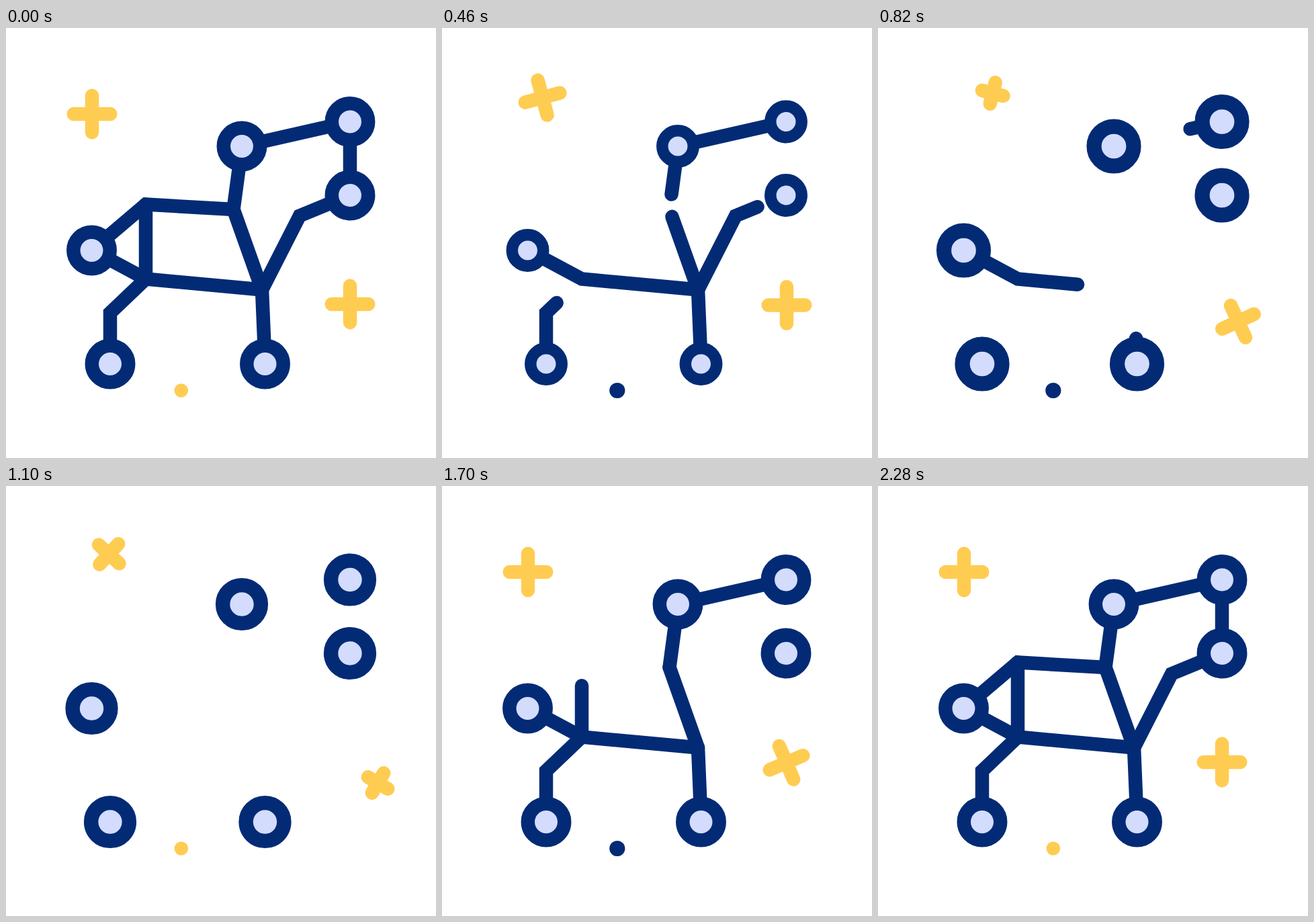
Animation, 640 px wide and 640 px high, one loop 2.8 s. Source, as an HTML page:

```html
<!DOCTYPE html>
<html lang="en">
<head>
<meta charset="utf-8">
<title>Constellation</title>
<style>
  html, body { margin: 0; width: 100%; height: 100%; overflow: hidden; background: #fff; }
  svg { display: block; width: 100%; height: 100%; }
</style>
</head>
<body>
<svg id="stage" viewBox="0 0 640 640" fill="none" stroke-width="20.5" stroke-linecap="round" stroke-miterlimit="10"></svg>
<script>
const LOOP = 2800;
const NAVY = '#032b75', PALE = '#d3dcfd', GOLD = '#ffcc52';
const stage = document.getElementById('stage');

function add(tag, attrs, parent = stage) {
  const el = document.createElementNS('http://www.w3.org/2000/svg', tag);
  for (const k in attrs) el.setAttribute(k, attrs[k]);
  parent.appendChild(el);
  return el;
}

// Smooth 0..1 ramp between two times
function ease(t, from, to) {
  const s = Math.min(1, Math.max(0, (t - from) / (to - from)));
  return s * s * (3 - 2 * s);
}

// Rises over a..b, falls over b..c
const swing = (t, a, b, c) => ease(t, a, b) - ease(t, b, c);

// Each line: path, retract from/to, draw from/to
const lines = [
  ['M152 343.5L208 373.5L381 389.5', 660, 1060, 1280, 1680],
  ['M155 473V424L208 373.5', 312, 645, 1110, 1440],
  ['M208 373.5V262.5', 60, 310, 1500, 1820],
  ['M384.5 473L381 389.5L338.5 270', 390, 890, 1240, 1640],
  ['M485.5 145.5L377.5 170', 600, 908, 1332, 1582],
  ['M347.5 203L338.5 270', 364, 614, 1560, 1700],
  ['M338.5 270L208 262.5L148.5 313', 10, 370, 1800, 2150],
  ['M381 389.5L437 279.5L487 259', 380, 780, 1700, 2090],
  ['M512 222V167', 0, 300, 2080, 2280]
].map(([d, ...times]) => ({ el: add('path', { d, pathLength: 1, stroke: NAVY }), times }));

const nodes = [[127.5, 331], [155, 500], [385.5, 500], [512, 249], [512, 139.5], [351, 176]]
  .map(([x, y]) => {
    const el = add('circle', { r: 27.2, fill: PALE, stroke: NAVY });
    return { el, x, y };
  });

const stars = [
  { x: 128, y: 128, dir: -1, delay: 0 },
  { x: 512, y: 411, dir: 1, delay: 330 }
].map(s => ({ ...s, el: add('path', { stroke: GOLD }) }));

add('circle', { cx: 260.8, cy: 539.5, r: 10.3, fill: GOLD });
const blink = add('circle', { cx: 260.8, cy: 539.5, r: 11.6, fill: NAVY });

function drawLine({ el, times: [a, b, c, d] }, t) {
  const v = 1 - ease(t, a, b) + ease(t, c, d);
  el.style.display = v < 0.002 ? 'none' : '';
  el.setAttribute('stroke-dasharray', v > 0.999 ? 'none' : v + ' 2');
}

function drawStar({ el, x, y, dir, delay }, time) {
  const t = time - delay;
  const u = swing(t, 60, 860, 1406);
  const dy = 31 * (1 - Math.pow(1 - u, 2.2));
  const turn = -180 * swing(t, 362, 916, 1503);
  const h = 27.3 - 11.1 * swing(t, 400, 850, 1430);
  el.setAttribute('d', `M${-h} 0H${h}M0 ${-h}V${h}`);
  el.setAttribute('transform', `translate(${x + 43 * u} ${y + dir * dy}) rotate(${turn})`);
}

function render(t) {
  lines.forEach(l => drawLine(l, t));
  const size = 1 - 0.2 * ease(t, 0, 297) + 0.3 * ease(t, 297, 909) - 0.1 * ease(t, 909, 1267);
  nodes.forEach(n => n.el.setAttribute('transform', `translate(${n.x} ${n.y}) scale(${size})`));
  stars.forEach(s => drawStar(s, t));
  const dark = (t >= 240 && t < 960) || (t >= 1280 && t < 1940);
  blink.style.display = dark ? '' : 'none';
}

const start = performance.now();
function tick() {
  render((performance.now() - start) % LOOP);
  requestAnimationFrame(tick);
}
render(0);
requestAnimationFrame(tick);
</script>
</body>
</html>
```
